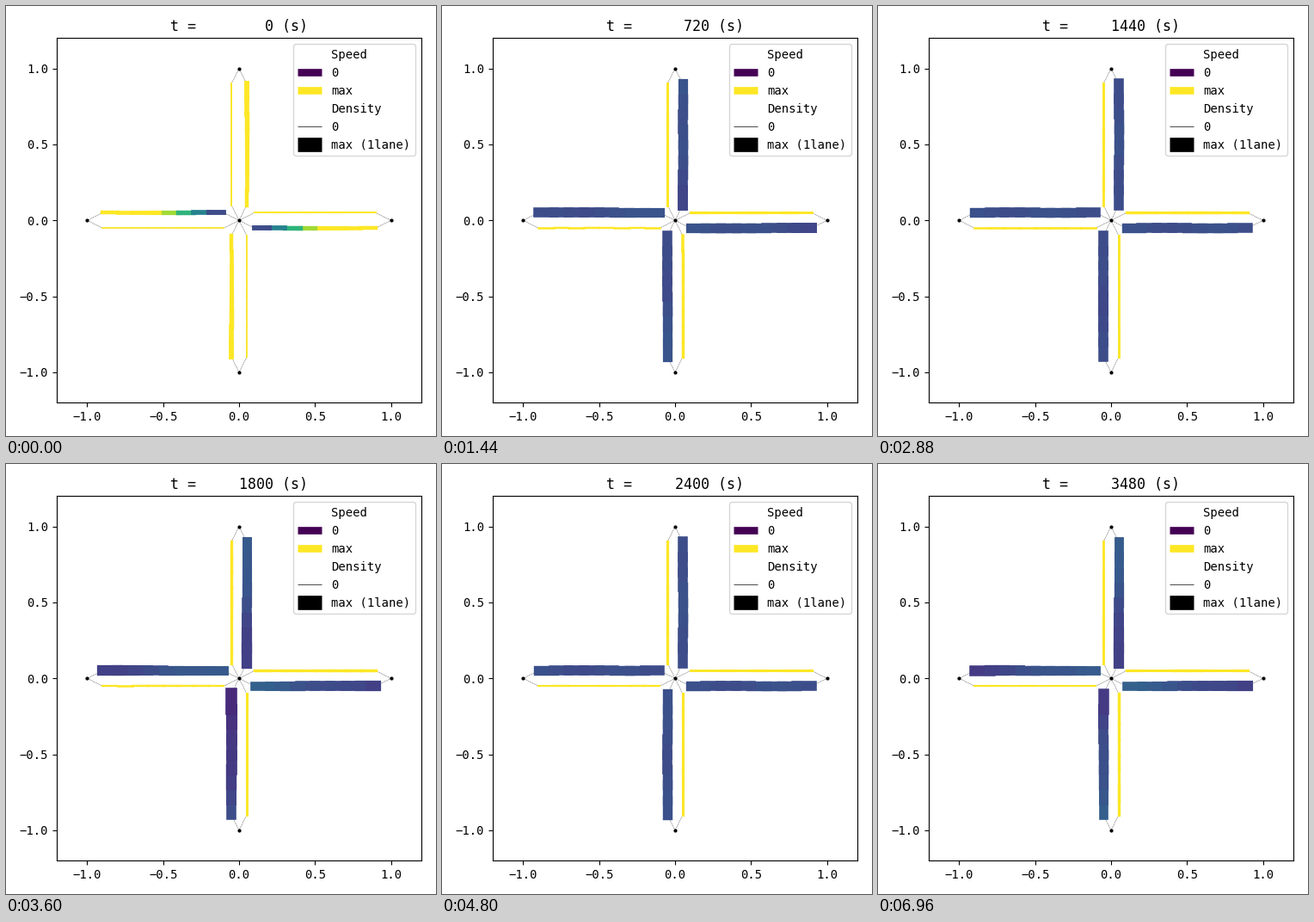
A matplotlib script for the animation above (7.2 s loop, 500 by 500 pixels).

```python
import numpy as np
import matplotlib.pyplot as plt
from matplotlib.animation import FuncAnimation

plt.rcParams["font.family"] = "DejaVu Sans Mono"

FRAMES, INTERVAL, STEP = 30, 240, 120
SEGS = 8
MIN_LW, MAX_LW = 0.5, 12
CENTER = (0, 0)
ARMS = [(-1, 0), (0, 1), (1, 0), (0, -1)]  # west, north, east, south
WEST, SOUTH = 0, 3
BEAT = 13                       # frames between equal signal patterns
JAMS = [(SOUTH, 15), (WEST, 24)]  # arm and frame of each heavy jam

arm, seg = np.mgrid[:len(ARMS), :SEGS]
pos = seg / (SEGS - 1)          # 0 at the far end, 1 at the junction
side = 1 - 2 * (arm % 2)        # +1 on west and east, -1 on north and south

# Outbound traffic is light, and lightest towards the west.
rng = np.random.default_rng(4)
out_mean = np.where(arm == WEST, .11, .15)
out_noise = (rng.uniform(-.02, .02, (FRAMES, len(ARMS), 1))
             + rng.uniform(-.01, .01, (FRAMES, len(ARMS), SEGS)))


def congested_speed(frame):
    """Queues swing between the two roads with the beat of the signals."""
    swing = .25 + .75 * np.cos(2 * np.pi * (frame - 3) / BEAT)
    v = .24 + .11 * side * swing * (pos - .5)
    v += .012 * np.sin(1.1 * seg + 2.3 * frame + 1.7 * arm)
    for jammed, peak in JAMS:
        v -= .07 * (arm == jammed) * np.exp(-((frame - peak) / 2.5) ** 2)
    return v


def state(frame):
    """Inbound speed and density, outbound density, each as (arm, segment)."""
    v = congested_speed(frame)
    k = .5 / (.5 + v)
    # queues build up from free flow, with one road waiting at the start
    filled = 1 - max(0, 1 - frame / 3) ** 3
    start_v = np.where(side > 0, np.clip(1.7 - .21 * seg, 0, 1), 1)
    start_k = .28 + .09 * side * (pos - .5)
    v = start_v + (v - start_v) * filled
    k = start_k + (k - start_k) * filled
    out = (out_mean + out_noise[frame]) * (.5 + .5 * filled)
    return v, k, out


def width(k):
    return MIN_LW + (MAX_LW - MIN_LW) * k


fig = plt.figure(figsize=(5, 5), dpi=100)
ax = fig.add_axes([59 / 500, 38.72 / 500, 424 / 500, 423.95 / 500])
ax.set_xlim(-1.2, 1.2)
ax.set_ylim(-1.2, 1.2)
ticks = np.linspace(-1, 1, 5)
ax.set_xticks(ticks)
ax.set_yticks(ticks)
title = ax.set_title("")
viridis = plt.colormaps["viridis"]


def add_link(start, end):
    a, b = np.array(start, float), np.array(end, float)
    shift = 0.05 * np.array([a[1] - b[1], b[0] - a[0]])
    part = np.linspace(.1, .9, SEGS + 1)[:, None]
    mid = a + (b - a) * part + shift
    ax.plot(*np.vstack([a, mid, b]).T, "k--", lw=0.25, zorder=5)
    return [ax.plot(*mid[n:n + 2].T, color=viridis(1.0), zorder=6)[0]
            for n in range(SEGS)]


def add_key(label, color="none", lw=0.0):
    ax.plot([], [], color=color, lw=lw, label=label, solid_capstyle="butt")


for x, y in ARMS + [CENTER]:
    ax.plot(x, y, "ko", ms=2, zorder=10)
inbound = [add_link(end, CENTER) for end in ARMS]
outbound = [add_link(CENTER, end) for end in ARMS]

mid_lw = (MIN_LW + MAX_LW) / 2
add_key("Speed")
add_key("0", viridis(0.0), mid_lw)
add_key("max", viridis(1.0), mid_lw)
add_key("Density")
add_key("0", "k", MIN_LW)
add_key("max (1lane)", "k", MAX_LW)
ax.legend(loc="upper right")


def update(frame):
    title.set_text(f"t = {frame * STEP:>8} (s)")
    v, k, out = state(frame)
    for i in range(len(ARMS)):
        for n in range(SEGS):
            inbound[i][n].set_color(viridis(float(v[i, n])))
            inbound[i][n].set_linewidth(width(k[i, n]))
            outbound[i][n].set_linewidth(width(out[i, n]))


anim = FuncAnimation(fig, update, frames=FRAMES, interval=INTERVAL,
                     init_func=lambda: update(0), repeat=True, repeat_delay=0)
plt.show()
```
